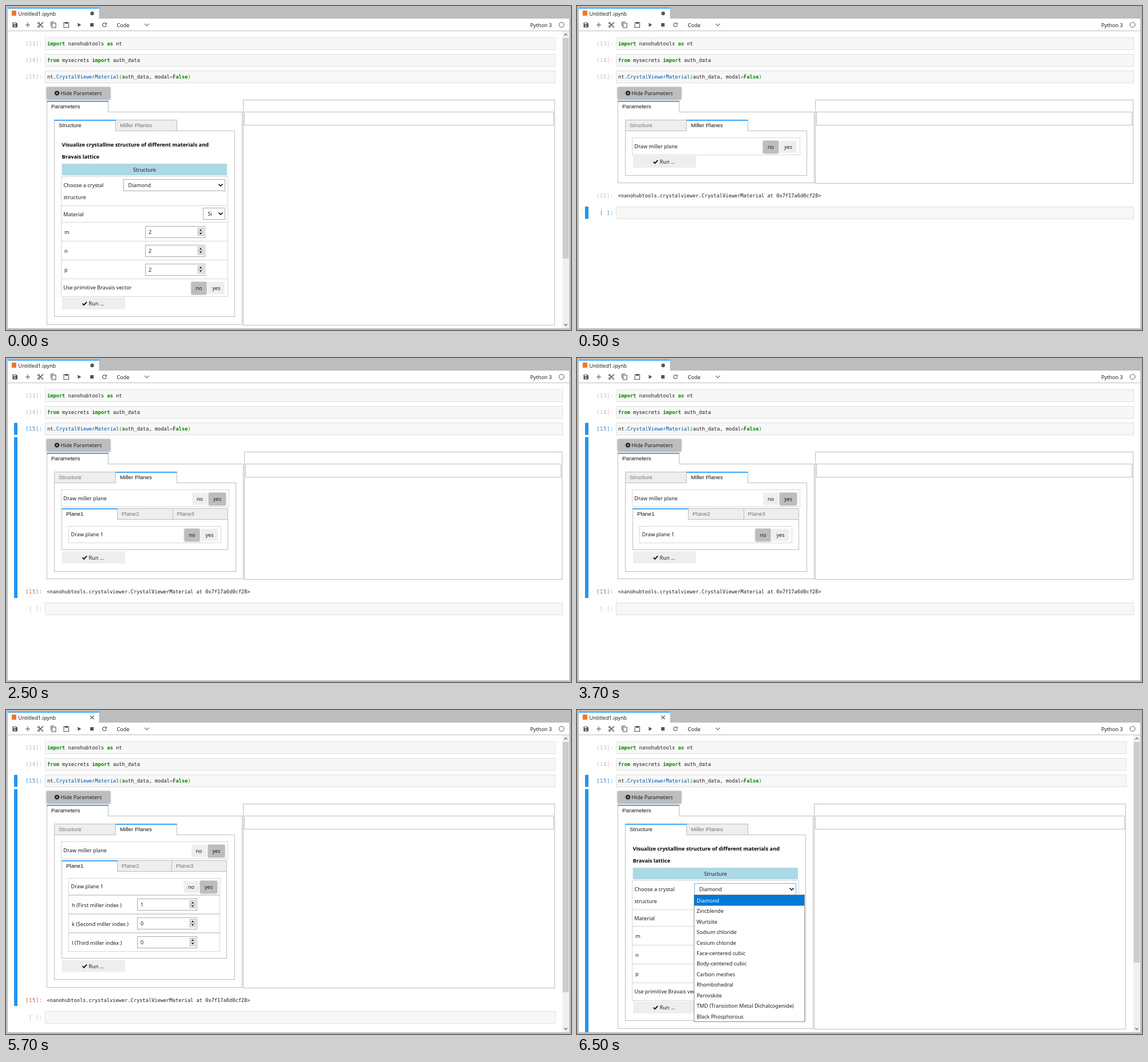
Animation, 987 px wide and 567 px high, one loop 8000 ms. Source, as an HTML page:

```html
<!DOCTYPE html>
<html lang="en">
<head>
<meta charset="utf-8">
<title>Notebook crystal viewer</title>
<style>
  html, body { margin: 0; width: 100%; height: 100%; overflow: hidden; background: #bdbdbd; }
  svg { display: block; }
  text { white-space: pre; fill: #1c1c1c; }
  .line { shape-rendering: crispEdges; }
  .ui { font: 9.15px "Noto Sans", sans-serif; }
  .head { font: bold 9.18px "Noto Sans", sans-serif; fill: #000; }
  .tab { font: 9.75px "Liberation Sans", Arial, sans-serif; }
  .code { font: 8.68px "DejaVu Sans Mono", monospace; }
  .prompt { font: 8.68px "DejaVu Sans Mono", monospace; letter-spacing: .75px; }
  .kw { fill: #008000; font-weight: bold; }
  .prop { fill: #0055aa; }
  .op { fill: #aa22ff; }
  .br { fill: #00a000; }
  .pressed { filter: drop-shadow(0 1.5px .8px rgba(0, 0, 0, .24)) drop-shadow(0 .7px 1.8px rgba(0, 0, 0, .3)); }
</style>
</head>
<body>
<svg id="stage" width="987" height="567" viewBox="0 0 987 567"></svg>
<script>
const BLUE = '#2196f3', LINE = '#bdbdbd', SOFT = '#d6d6d6', FIELD = '#ababab', PALE = '#eeeeee', ICON = '#555';
const DURATION = 8000;

const esc = s => s.replace(/&/g, '&amp;').replace(/</g, '&lt;').replace(/>/g, '&gt;');
const fill = (x1, y1, x2, y2, color, extra = '') =>
  `<rect x="${x1}" y="${y1}" width="${x2 - x1}" height="${y2 - y1}" fill="${color}" ${extra}/>`;
const box = (x1, y1, x2, y2, stroke = LINE, color = '#fff') =>
  fill(x1, y1, x2, y2, color, `class="line" stroke="${stroke}"`);
const path = (d, stroke, width = 1, color = 'none') =>
  `<path d="${d}" fill="${color}" stroke="${stroke}" stroke-width="${width}"/>`;
const raw = (x, y, markup, cls, extra = '') =>
  `<text x="${x}" y="${y}" class="${cls}" ${extra}>${markup}</text>`;
const text = (x, y, s, cls = 'ui', color, anchor = 'start') =>
  raw(x, y, esc(s), cls, `text-anchor="${anchor}"` + (color ? ` style="fill:${color}"` : ''));
const chevron = (x, y, color = '#111', w = 1.7) =>
  path(`M${x - 3.6} ${y - 1.8}l3.6 3.6l3.6 -3.6`, color, w);

function gear(x, y) {
  return `<g transform="translate(${x} ${y})">` +
    `<circle r="2.5" fill="none" stroke="#1c1c1c" stroke-width="2"/>` +
    `<circle r="3.8" fill="none" stroke="#1c1c1c" stroke-width="1.4" stroke-dasharray="1.5 1.485"/></g>`;
}

function toolbar() {
  return path('M11.5 29h6.5l2 2v6.5h-8.5z', 'none', 0, ICON) +
    fill(13, 30, 17, 32, '#fff') + `<circle cx="15.6" cy="35" r="1.3" fill="#fff"/>` +
    path('M34 33h8M38 29v8', ICON, 1.2) +
    path('M57.5 30.8L65 37.4M57.5 35.2L65 28.6', ICON, 1.4) +
    `<g fill="none" stroke="${ICON}" stroke-width="1.2"><circle cx="57" cy="30" r="1.5"/><circle cx="57" cy="36" r="1.5"/></g>` +
    path('M78.5 35.5v-7.5h6M80.5 30h6.5v8h-6.5z', ICON, 1.1) +
    path('M101 29h8.5v8.5h-8.5z', ICON, 1.1) + fill(103, 28, 108, 31, ICON) +
    path('M125.3 29.5l6 3.5l-6 3.5z', 'none', 0, ICON) +
    fill(147, 30, 153, 36, ICON) +
    path('M174.6 30.6a3.4 3.4 0 1 0 .8 3.2', ICON, 1.2) +
    path('M175.8 29v3.4h-3.4z', 'none', 0, ICON) +
    text(193.5, 36.5, 'Code') + chevron(246, 33, ICON, 1.1) +
    text(953.5, 36.5, 'Python 3', 'ui', null, 'end') +
    `<circle cx="970.5" cy="33" r="4.4" fill="none" stroke="${ICON}"/>`;
}

function shell(o) {
  const mark = o.saved
    ? path('M147.3 9.8l6.4 6.4M153.7 9.8l-6.4 6.4', '#444', 1.1)
    : `<circle cx="150.5" cy="13" r="3.2" fill="${ICON}"/>`;
  return fill(0, 0, 987, 567, LINE) + fill(3, 3, 162.5, 23, '#fff') + fill(3, 3, 162.5, 4.5, BLUE) +
    fill(3, 22, 984, 564, '#fff') + fill(3, 43, 984, 44, LINE) +
    fill(10, 8, 18, 17, '#f37626') + text(21.5, 16.5, 'Untitled1.ipynb') + mark + toolbar();
}

function scrollbar(end) {
  return fill(972, 44, 984, 564, '#f0f0f0') + fill(972.5, 56, 983, end, '#cdcdcd') +
    path('M975.2 51.4l2.6 -2.6l2.6 2.6M975.2 556.6l2.6 2.6l2.6 -2.6', ICON, 1.3);
}

const prompt = (y, n, color = '#b8b8b8') => text(64, y, `[${n}]:`, 'prompt', color, 'end');
const cell = (y, n, right, color) =>
  box(68.5, y + .5, right - .5, y + 21.5, '#e0e0e0', '#f7f7f7') + prompt(y + 14, n, color);

function cells(o) {
  const kw = s => `<tspan class="kw">${s}</tspan>`;
  const right = o.thumb ? 960 : 973;
  return cell(55, 13, right) + cell(84, 14, right) + cell(113, 15, right, o.active ? '#307fc1' : undefined) +
    raw(72, 69, `${kw('import')} nanohubtools ${kw('as')} nt`, 'code') +
    raw(72, 98, `${kw('from')} mysecrets ${kw('import')} auth_data`, 'code') +
    raw(72, 127, 'nt.<tspan class="prop">CrystalViewerMaterial</tspan><tspan class="br">(</tspan>auth_data, modal' +
      `<tspan class="op">=</tspan>${kw('False')}<tspan class="br">)</tspan>`, 'code');
}

function result(y, o) {
  return prompt(y, 15, o.active ? '#bf5b3d' : undefined) +
    text(71.5, y, '<nanohubtools.crystalviewer.CrystalViewerMaterial at 0x7f17a6d0cf28>', 'code') +
    cell(y + 16, ' ', o.thumb ? 960 : 973, o.active ? undefined : '#307fc1');
}

// Tab row over a bordered body; xs are the tab edges.
function tabs(xs, names, active, top, right, bottom) {
  const base = top + 19;
  let s = box(xs[0] + .5, base + .5, right, bottom);
  names.forEach((name, i) => {
    const on = i === active, x = xs[i], x2 = xs[i + 1];
    s += box(x + .5, top + .5, x2 + .5, base + .5, LINE, on ? '#fff' : PALE);
    if (on) s += fill(x + 1, base, x2, base + 2, '#fff');
    s += text(x + 8, top + 13.3, name, 'tab', on ? '#111' : '#757575');
  });
  return s + fill(xs[active], top, xs[active + 1] + .5, top + 1.7, BLUE);
}

function toggle(x, y, yes) {
  const button = (x1, x2, label, on) =>
    fill(x1, y, x2, y + 21, on ? LINE : PALE, on ? 'class="pressed"' : '') +
    text((x1 + x2) / 2, y + 14, label, 'ui', null, 'middle');
  return button(x, x + 26, 'no', !yes) + button(x + 29, x + 58, 'yes', yes);
}

function spinner(x, y, value) {
  return box(x + .5, y + .5, x + 104.5, y + 20.5, FIELD) + text(x + 6, y + 14, value) +
    box(x + 92.5, y + 3.5, x + 101.5, y + 16.5, FIELD, '#f0f0f0') +
    fill(x + 92, y + 10, x + 102, y + 11, FIELD) +
    path(`M${x + 94.4} ${y + 8.6}l2.6 -3l2.6 3zM${x + 94.4} ${y + 12}l2.6 3l2.6 -3z`, 'none', 0, '#222');
}

const select = (x, y, value, focus) =>
  box(x + .5, y + .5, 382.5, y + 20.5, focus ? '#64b5f6' : FIELD) +
  text(x + 8.6, y + 14, value) + chevron(375, y + 10.3);

const run = y => fill(98, y, 208, y + 21, PALE) +
  path(`M133.5 ${y + 10.6}l2.6 2.6l5 -5.2`, '#1c1c1c', 2) + text(144.6, y + 14, 'Run ...');

function viewer(o, d) {
  const r = o.thumb ? 958.5 : 971.5;
  return fill(71, 142, 182, 163, LINE, 'class="pressed"') + gear(89, 152.5) + text(95.6, 156.3, 'Hide Parameters') +
    box(414.5 + d, 164.5, r, o.bottom + 1.5) + box(416.5 + d, 185.5, r - 2, 208.5) +
    tabs([71, 178], ['Parameters'], 0, 166, 412.5 + d, o.bottom + .5) +
    tabs([84, 191, 298], ['Structure', 'Miller Planes'], o.miller ? 1 : 0, 199, 399.5 + d, o.bottom - 13);
}

function structure(o) {
  const edges = [298, 349, 378, 411, 444, 477, 508];
  let s = text(97.5, 245.5, 'Visualize crystalline structure of different materials and', 'head') +
    text(97.5, 266.5, 'Bravais lattice', 'head') +
    fill(97.5, 276, 386, 296.5, '#add8e6') + text(242, 290, 'Structure', 'ui', null, 'middle');
  for (let i = 0; i < 6; i++) s += box(96.5, edges[i] + .5, 387.5, edges[i + 1] + .5, SOFT);
  s += text(100.5, 317, 'Choose a crystal') + text(100.5, 338, 'structure') +
    select(205, 303, 'Diamond', o.menu) + text(100.3, 368, 'Material') + select(344, 353, 'Si');
  [...'mnp'].forEach((name, i) => {
    s += text(102, 399 + i * 33, name) + spinner(243, 385 + i * 32.75, '2');
  });
  return s + text(100.3, 496, 'Use primitive Bravais vector') + toggle(324, 483, false) + run(510);
}

function menu() {
  const items = ['Diamond', 'Zincblende', 'Wurtzite', 'Sodium chloride', 'Cesium chloride',
    'Face-centered cubic', 'Body-centered cubic', 'Carbon meshes', 'Rhombohedral', 'Perovskite',
    'TMD (Transistion Metal Dichalcogenide)', 'Black Phosphorous'];
  return box(204.5, 323.5, 397.5, 545.5, '#8a8a8a') + fill(205, 324, 397, 342.5, '#0078d7') +
    items.map((s, i) => text(209, 337 + i * 18.41, s, 'ui', i ? null : '#fff')).join('');
}

function miller(o, d) {
  let s = box(96.5, 230.5, 387.5 + d, 260.5, SOFT) + text(100.3, 249, 'Draw miller plane') +
    toggle(324 + d, 236, o.planes);
  if (!o.planes) return s + run(262);
  const end = o.index ? 434.5 : 335.5;
  s += tabs([97, 194, 289 + d, 385 + d], ['Plane1', 'Plane2', 'Plane3'], 0, 263, 385.5 + d, end) +
    box(109.5, 294.5, 373.5 + d, 323.5, SOFT) + text(113.6, 312, 'Draw plane 1') +
    toggle(310.5 + d, 299, o.index);
  if (o.index) ['h (First miller index )', 'k (Second miller index )', 'l (Third miller index )'].forEach((name, i) => {
    const y = 324 + i * 33;
    s += box(109.5, y + .5, 373.5, y + 32.5, SOFT) + text(115, y + 21, name) +
      spinner(229, 330 + i * 32.75, i ? '0' : '1');
  });
  return s + run(end + 3);
}

const marker = (y1, y2) => fill(14, y1, 20, y2, BLUE);

function scene(o) {
  const d = o.thumb ? 0 : 1.5;
  let s = shell(o) + cells(o) + viewer(o, d) + (o.miller ? miller(o, d) : structure(o));
  if (o.output) s += result(o.output, o);
  if (o.active) s += marker(113.5, 134.5) + marker(138.5, o.active);
  else if (o.output) s += marker(351, 372.5);
  if (o.thumb) s += scrollbar(o.thumb);
  if (o.menu) s += menu();
  return `<g display="none">${s}</g>`;
}

const steps = [
  { at: 0, bottom: 556.5, thumb: 442 },
  { at: 500, bottom: 309, miller: true, planes: false, output: 335 },
  { at: 2500, bottom: 386, miller: true, planes: true, index: false, output: 412, active: 420 },
  { at: 4500, bottom: 484.5, miller: true, planes: true, index: true, output: 510.5, active: 518, thumb: 494, saved: true },
  { at: 6500, bottom: 556.5, thumb: 442, active: 564, menu: true, saved: true }
];

const stage = document.getElementById('stage');
stage.innerHTML = steps.map(scene).join('');
const groups = [...stage.children];
let shown = -1;

function draw() {
  const t = performance.now() % DURATION;
  const now = steps.filter(s => s.at <= t).length - 1;
  if (now !== shown) {
    groups.forEach((g, i) => g.setAttribute('display', i === now ? 'inline' : 'none'));
    shown = now;
  }
  requestAnimationFrame(draw);
}
draw();
</script>
</body>
</html>
```
